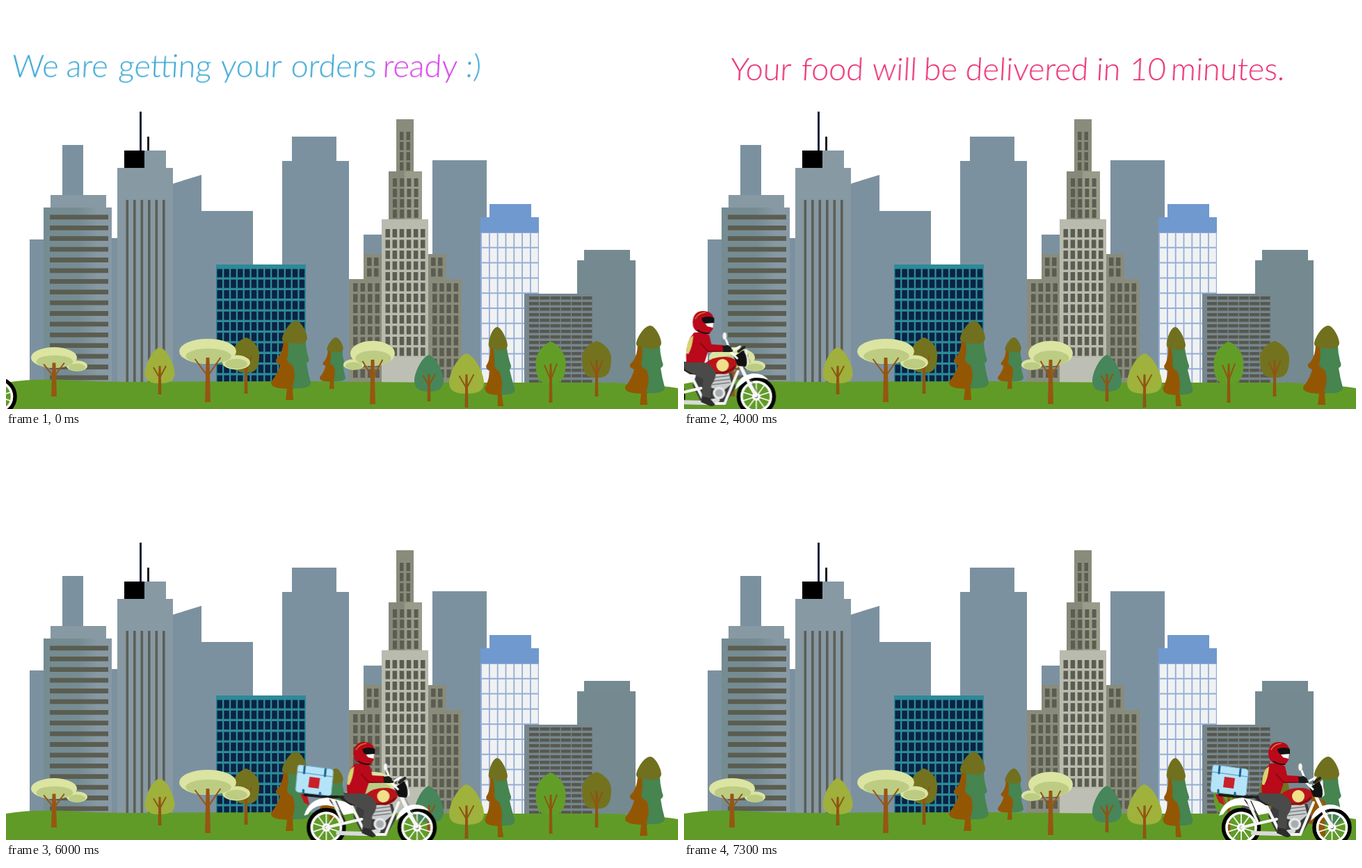
An HTML page that plays this animation: 966 px wide and 580 px high, repeating every 7400 ms.

```html
<!DOCTYPE html>
<html lang="en">
<head>
<meta charset="utf-8">
<title>Delivery</title>
<style>
html, body { margin: 0; width: 100%; height: 100%; overflow: hidden; background: #fff; }
svg { display: block; width: 966px; height: 580px; }
text { font: normal 300 45px Lato, "Open Sans", sans-serif; }
#bike { animation: ride 7400ms infinite; }
#preparing { animation: preparing 7400ms step-end infinite; }
#arriving { animation: arriving 7400ms step-end infinite; }

/* The picture holds for 500 ms, then 200 ms, then 100 ms per step. */
@keyframes ride {
  0%      { transform: translateX(-944px); animation-timing-function: steps(8); }
  54.054% { transform: translateX(-827.6px); animation-timing-function: steps(2); }
  59.459% { transform: translateX(-798.5px); animation-timing-function: steps(1); }
  60.810% { transform: translateX(-784px); animation-timing-function: steps(11); }
  75.675% { transform: translateX(-485.5px); animation-timing-function: steps(11); }
  90.540% { transform: translateX(-87px); animation-timing-function: steps(7); }
  100%    { transform: translateX(14.5px); }
}
@keyframes preparing { 0% { opacity: 1; } 47.297%, 100% { opacity: 0; } }
@keyframes arriving { 0% { opacity: 0; } 54.054% { opacity: 1; } 77.027%, 100% { opacity: 0; } }
</style>
</head>
<body>
<svg viewBox="0 0 966 580">
  <defs>
    <linearGradient id="slate"><stop offset=".5" stop-color="#758c92"/><stop offset=".8" stop-color="#8799a4"/></linearGradient>
    <linearGradient id="stone"><stop offset=".45" stop-color="#86897a"/><stop offset=".5" stop-color="#999c8a"/></linearGradient>
    <g id="fir">
      <path fill="#935704" d="M399 482Q398 500 388 509Q387 514 394 516Q391 529 381 541Q380 548 392 550L404 551L402 567H413L412 551L419 548L414 484Z"/>
      <path fill="#468450" d="M405 484Q414 487 431 482Q431 494 435 507Q437 511 432 514Q434 528 438 542Q438 549 424 550Q416 551 411 549Q418 530 412 517Q404 513 404 508Q407 496 405 484Z"/>
      <path fill="#71701f" d="M417 453C424 453 433 470 433 478Q433 484 424 486Q412 487 400 483Q395 482 398 474C402 464 410 453 417 453Z"/>
    </g>
    <g id="wheel" fill="none">
      <circle r="25.5" stroke="#000" stroke-width="5.5"/>
      <circle r="21" stroke="#fff" stroke-width="3.5"/>
      <g id="spokes" stroke="#f4f4f4" stroke-width="1.8"></g>
      <circle r="6" fill="#fff"/><circle r="2.4" fill="#222"/>
    </g>
  </defs>

  <g id="city"></g>
  <path fill="#619b27" d="M0 542Q45 535 100 539Q140 541 200 541Q320 540 440 540Q570 542 700 542H860Q920 543 966 550V580H0Z"/>
  <g id="trees"></g>

  <g id="preparing" transform="translate(0 102.5) skewX(-3)" fill="#35a5d3">
    <text><tspan x="8">We</tspan> <tspan x="86">are</tspan> <tspan x="161">getting</tspan> <tspan x="308">your</tspan> <tspan x="409">orders</tspan> <tspan x="541" fill="#d43be9">ready</tspan> <tspan x="660">:)</tspan></text>
  </g>
  <g id="arriving" transform="translate(0 107) skewX(-3)" fill="#ec2a70">
    <text><tspan x="66">Your</tspan> <tspan x="168">food</tspan> <tspan x="270">will</tspan> <tspan x="344">be</tspan> <tspan x="404">delivered</tspan> <tspan x="592">in</tspan> <tspan x="640">10</tspan> <tspan x="699">minutes.</tspan></text>
  </g>

  <g id="bike" stroke-linecap="round" stroke-linejoin="round">
    <use href="#wheel" x="801" y="562"/>
    <use href="#wheel" x="931.5" y="562"/>
    <!-- rack, tail light and rear fender -->
    <path fill="#c4161d" d="M764 514H773L777 530L769 526Z"/>
    <path fill="none" stroke="#1c1c1c" stroke-width="4" d="M770 515L800 518H818"/>
    <path fill="#fff" d="M769 545Q776 520 803 519L836 527L842 541L826 544Q816 530 800 530Q782 530 775 543Z"/>
    <path fill="none" stroke="#333" stroke-width="1.5" d="M806 522L820 542M815 524L828 552"/>
    <!-- frame, engine and exhaust -->
    <path fill="#3c3c3c" d="M846 528H896L902 548L888 572H853L840 546Z"/>
    <path fill="none" stroke="#f5f5f5" stroke-width="4" d="M801 562L852 550M812 527L824 553M838 532L858 572H886L905 526"/>
    <path fill="none" stroke="#d8dadb" stroke-width="6" d="M818 570L856 571L876 567"/>
    <path fill="#c9cccd" d="M866 530L892 528L896 544L884 554L865 549Z"/>
    <path fill="none" stroke="#7b7f80" stroke-width="1.5" d="M868 535L893 532M868 540L894 537M868 545L893 542"/>
    <circle cx="878" cy="557" r="9" fill="#e4e6e7"/><circle cx="878" cy="557" r="5.5" fill="#a9adaf"/>
    <!-- seat and tank -->
    <path fill="#242424" d="M815 517Q842 513 864 522L866 532L836 530Z"/>
    <path fill="#b9141a" d="M858 514Q869 504 889 505Q902 506 904 515Q902 526 886 530L863 528Z"/>
    <path fill="none" stroke="#701014" stroke-width="2" d="M864 528Q890 531 901 519"/>
    <circle cx="883" cy="517" r="9" fill="#efe08a"/>
    <!-- fork, front fender, lamp and mirror -->
    <path fill="none" stroke="#f7f7f7" stroke-width="5" d="M901 502L915 531L931 561"/>
    <path fill="none" stroke="#777" stroke-width="1" d="M906 502L919 529L934 558"/>
    <path fill="#fff" d="M901 552Q905 532 926 529Q941 528 949 538Q928 531 915 541Z"/>
    <path fill="#111" d="M899 505L912 496Q920 495 920 506Q920 515 916 519L905 518Z"/>
    <path fill="#eee" d="M914 497L918 493L921 515L917 519Q920 508 914 497Z"/>
    <path fill="none" stroke="#fff" stroke-width="3" d="M887 478L895 498L904 507M895 497L908 490"/>
    <path fill="none" stroke="#222" stroke-width="4" d="M884 494L896 496M906 497L914 491"/>
    <ellipse cx="886" cy="475" rx="3" ry="5.5" fill="#f7f7f7" stroke="#aaa" stroke-width=".8"/>
    <!-- delivery box -->
    <path fill="#b5e4f9" stroke="#85bfdc" d="M763 472L808 478Q811 479 811 482L808 514Q807 516 804 516L760 511Q757 510 757 507L760 475Q760 472 763 472Z"/>
    <path fill="none" stroke="#6eacd0" stroke-width="1.5" d="M760 482L810 489"/>
    <path fill="none" stroke="#215f8f" stroke-width="3" d="M770 474L769 484M800 478L799 488M768 508V512M792 512V515"/>
    <path fill="#c9202a" d="M777 489L792 491L790 506L775 504Z"/>
    <!-- rider -->
    <path fill="#4a4a48" d="M826 512L852 511Q869 517 873 527Q874 536 867 545L865 566L853 565L855 537L832 525Q824 520 826 512Z"/>
    <path fill="#2d2d2d" d="M853 562L864 564L872 573Q872 576 866 576L852 570Z"/>
    <path fill="#b9091a" d="M842 470L856 469L864 474L867 487L884 488V497L862 498L857 513H831Q829 493 836 478Z"/>
    <path fill="#d8d271" d="M836 478L841 474Q840 490 834 501L831 500Q831 487 836 478Z"/>
    <path fill="none" stroke="#790812" stroke-width="1.3" d="M851 485L862 497L884 497"/>
    <path fill="#191919" d="M883 489L891 488L896 492L894 498L884 498Z"/>
    <path fill="#b9091a" d="M840 455Q841 439 855 439Q868 439 870 449L869 465L864 472Q851 472 846 468Q840 465 840 455Z"/>
    <path fill="#fff" d="M856 454L870 454L869 463L861 461Z"/>
    <path fill="#111" d="M853 449Q863 445 871 449V456L858 457Q853 454 853 449Z"/>
    <path fill="none" stroke="#e0a33c" stroke-width="1.2" d="M844 450Q848 442 858 441"/>
    <path fill="none" stroke="#111" stroke-width="1.8" d="M847 467Q856 472 863 471"/>
  </g>
</svg>
<script>
const box = (x1, y1, x2, y2, fill) =>
  `<path fill="${fill}" d="M${x1} ${y1}H${x2}V${y2}H${x1}Z"/>`;

const grid = (x, y, cols, rows, dx, dy, w, h, fill) => {
  let d = '';
  for (let r = 0; r < rows; r++)
    for (let c = 0; c < cols; c++) d += `M${x + c * dx} ${y + r * dy}h${w}v${h}h${-w}z`;
  return `<path fill="${fill}" d="${d}"/>`;
};

const haze = '#7c91a0', steel = '#8799a3', olive = '#8a8c7b', pane = '#5b5d51', sky = '#7099cf';
const ground = 543;

const city = [
  // distant skyline
  box(34, 336, 56, ground, haze),
  box(81, 200, 111, 274, haze),
  box(152, 334, 161, ground, haze),
  `<path fill="${haze}" d="M239 256L281 243V295H355V${ground}H239Z"/>`,
  box(411, 188, 475, 224, haze),
  box(397, 223, 493, ground, haze),
  box(514, 329, 541, 360, haze),
  box(613, 222, 691, ground, haze),
  // striped tower
  box(64, 272, 144, 291, steel),
  box(54, 290, 152, ground, 'url(#slate)'),
  grid(63, 300.5, 1, 16, 0, 15.4, 84, 6.8, pane),
  // antenna tower
  box(192, 152, 195, 209, '#10213c'),
  box(203, 188, 206, 209, '#181c20'),
  box(199, 208, 230, 234, steel),
  box(170, 208, 199, 233, '#000'),
  box(160, 233, 240, ground, steel),
  grid(172.5, 279, 6, 1, 10.5, 0, 3.6, 262, '#5c5e58'),
  // teal office block
  box(302, 372, 431, ground, '#2c8b98'),
  grid(303.5, 378.5, 13, 11, 9.85, 15.3, 7.5, 12, '#0b2344'),
  // stepped tower
  box(561, 163, 586, 239, olive),
  grid(566, 181, 2, 4, 9.5, 14.6, 5.5, 12, pane),
  box(550, 238, 598, 308, 'url(#stone)'),
  grid(556, 248, 4, 4, 10.2, 15, 6, 12, pane),
  box(514, 357, 633, 394, olive),
  grid(519, 362, 2, 2, 10, 15.5, 6.5, 12, pane),
  grid(611, 362, 2, 2, 10, 15.5, 6.5, 12, pane),
  box(493, 393, 655, ground, olive),
  grid(499, 399, 4, 9, 10.5, 15.5, 6.5, 12, pane),
  grid(613, 399, 4, 9, 10.2, 15.5, 6.5, 12, pane),
  box(540, 307, 607, ground, '#b8bbae'),
  grid(545.5, 321, 6, 12, 10.1, 15.5, 6.5, 12, pane),
  box(540, 506, 607, ground, '#bdbfb4'),
  // eastern buildings
  box(831, 351, 897, 368, '#758a91'),
  box(821, 366, 905, ground, '#748a90'),
  box(695, 285, 755, 305, sky),
  box(682, 304, 766, ground, sky),
  box(682, 326, 766, ground, '#93aed4'),
  grid(684, 327, 7, 10, 11.8, 21.8, 10, 19.8, '#f0f1f3'),
  box(745, 414, 844, ground, '#77868d'),
  grid(752, 418, 6, 16, 15.3, 8, 14, 4.6, '#56584f'),
].join('');

const trunk = (x, top, base, spread, width, color) => {
  const fork = top + (base - top) * .42;
  return `<path fill="${color}" d="M${x - width * .3} ${top}H${x + width * .3}L${x + width / 2} ${base}H${x - width / 2}Z"/>
    <path fill="none" stroke="${color}" stroke-width="2" d="M${x - spread} ${top + 2}L${x} ${fork}L${x + spread} ${top}"/>`;
};

// belly: height share at which the crown is widest
const leafy = (x, top, bottom, base, half, fill, belly) => {
  const h = bottom - top, mid = top + h * belly;
  const side = s => `C${x + s * half * .5} ${top + h * .06} ${x + s * half} ${mid - h * .22} ${x + s * half} ${mid}
    C${x + s * half} ${bottom - h * .06} ${x + s * half * .6} ${bottom} ${x} ${bottom}`;
  return `<path fill="${fill}" d="M${x} ${top}${side(1)}ZM${x} ${top}${side(-1)}Z"/>`
    + trunk(x, top + h * .52, base, half * .42, 5, '#8f5513');
};

const ellipse = (x, y, rx, ry, fill) =>
  `<ellipse cx="${x}" cy="${y}" rx="${rx}" ry="${ry}" fill="${fill}"/>`;

const acacia = (x, y, rx, ry, lobeX, lobeY, lobeR, base) => {
  const light = '#dbe4a1', shade = '#bdcc83';
  return ellipse(lobeX, lobeY, lobeR, lobeR * .52, light)
    + ellipse(lobeX, lobeY + 2, lobeR * .8, lobeR * .36, shade)
    + ellipse(x, y, rx, ry, light)
    + ellipse(x + 1, y + ry * .38, rx * .8, ry * .6, shade)
    + trunk(x, y + ry * .5, base, rx * .45, 8, '#965613');
};

const fir = (left, top, sx, sy, lean = 0) =>
  `<use href="#fir" transform="translate(${left} ${top}) skewX(${lean}) scale(${sx} ${sy}) translate(-381 -453)"/>`;

const trees = [
  acacia(69, 506, 33, 15, 102, 518, 15, 562),
  leafy(221, 491, 543, 559, 21.5, '#9fb03c', .72),
  leafy(345, 477, 528, 558, 19, '#73731f', .48),
  acacia(290, 497, 41, 18, 331, 513, 20, 570),
  fir(381, 453, 1, 1),
  fir(451, 477, .65, .65),
  acacia(527, 500, 32, 18, 500, 516, 15, 573),
  leafy(608, 502, 555, 569, 21, '#46865a', .7),
  leafy(662, 500, 558, 578, 25, '#9fb23c', .72),
  fir(679, 462, .755, 1, 6),
  leafy(783, 483, 544, 571, 21.5, '#629e27', .5),
  leafy(849, 482, 535, 562, 21, '#73731f', .47),
  fir(890, 460, 1, 1),
].join('');

const spokes = Array.from({ length: 10 }, (_, i) =>
  `<path d="M0 0V-20" transform="rotate(${i * 36})"/>`).join('');

const fill = (id, markup) => { document.getElementById(id).innerHTML = markup; };
fill('city', city);
fill('trees', trees);
fill('spokes', spokes);
</script>
</body>
</html>
```
